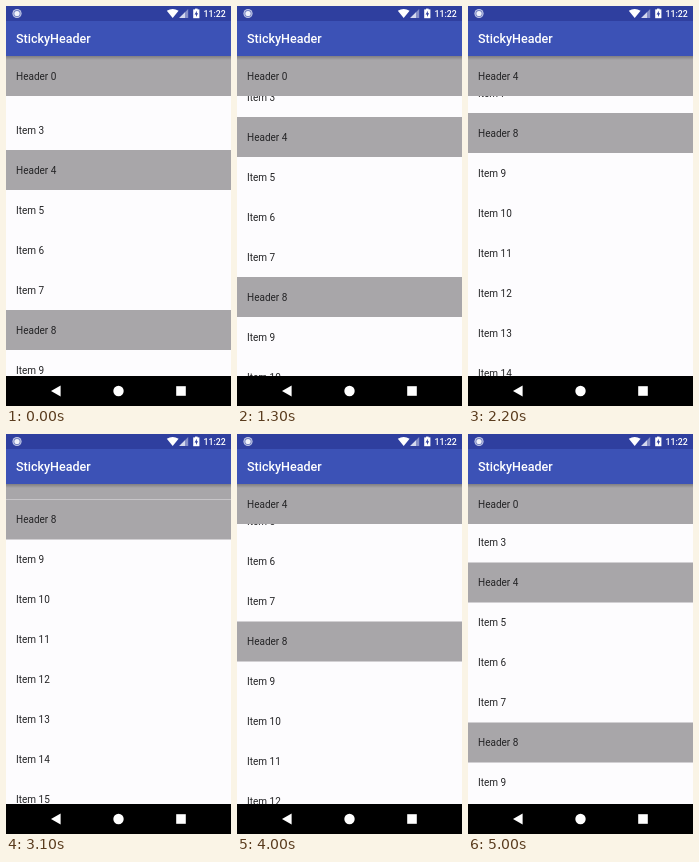
An HTML page with a canvas for the animation above (5100 ms loop, 225 by 400 pixels).

```html
<!DOCTYPE html>
<html lang="en">
<head>
<meta charset="utf-8">
<title>Sticky header list</title>
<style>
  html, body { margin: 0; width: 100%; height: 100%; overflow: hidden; background: #000; }
  canvas { display: block; width: 225px; height: 400px; }
</style>
</head>
<body>
<canvas id="stage"></canvas>
<script>
const W = 225, H = 400, LOOP = 5100, TICK = 100;
const ROW = 40, LIST_TOP = 50, LIST_BOTTOM = 370, FIRST_TOP = -16;
const HEADERS = [0, 4, 8];
const HEADER_GRAY = '#a8a6a9', PAPER = '#fdfcfe', INK = '#242426';

// Scroll path: time in ms, offset in px, speed in px per tick.
const PATH = [
  [1000, 0, 0], [1300, 33, 16], [1600, 95, 19], [2200, 197, 14.5],
  [2700, 250, 0], [2900, 250, 0], [3100, 238.5, -12], [4000, 116.5, -13.8],
  [4400, 62, -12.5], [5000, 15.5, -4.5]
];

const canvas = document.getElementById('stage');
const ctx = canvas.getContext('2d');
const ratio = window.devicePixelRatio || 1;
canvas.width = W * ratio;
canvas.height = H * ratio;
ctx.scale(ratio, ratio);

function scrollAt(time) {
  const next = PATH.findIndex(p => p[0] >= time);
  if (next <= 0) return PATH[0][1];
  const [t0, y0, v0] = PATH[next - 1], [t1, y1, v1] = PATH[next];
  const u = (time - t0) / (t1 - t0), ticks = (t1 - t0) / TICK;
  const ease = u * u * (3 - 2 * u);
  return y0 + (y1 - y0) * ease +
    ticks * u * (1 - u) * (v0 * (1 - u) - v1 * u);
}

function rect(x, y, w, h, color) {
  ctx.fillStyle = color;
  ctx.fillRect(x, y, w, h);
}

function text(str, x, y, size, weight, color) {
  ctx.font = `${weight} ${size}px Roboto, sans-serif`;
  ctx.fillStyle = color;
  ctx.fillText(str, x, y);
}

function polygon(color, ...points) {
  ctx.fillStyle = color;
  ctx.beginPath();
  points.forEach(([x, y]) => ctx.lineTo(x, y));
  ctx.fill();
}

function disc(x, y, r, color) {
  ctx.fillStyle = color;
  ctx.beginPath();
  ctx.arc(x, y, r, 0, Math.PI * 2);
  ctx.fill();
}

function drawRow(index, top) {
  const isHeader = HEADERS.includes(index);
  if (isHeader) rect(0, top, W, ROW, HEADER_GRAY);
  text(`${isHeader ? 'Header' : 'Item'} ${index}`, 10, top + 23.6, 10, 400, INK);
}

function drawList(scroll) {
  const topOf = index => FIRST_TOP + index * ROW - scroll;
  ctx.save();
  ctx.beginPath();
  ctx.rect(0, LIST_TOP, W, LIST_BOTTOM - LIST_TOP);
  ctx.clip();
  rect(0, LIST_TOP, W, LIST_BOTTOM - LIST_TOP, PAPER);

  for (let i = Math.floor((scroll + LIST_TOP - FIRST_TOP) / ROW); topOf(i) < LIST_BOTTOM; i++) {
    drawRow(i, topOf(i));
  }

  // The pinned header is pushed up by the one that follows it.
  const pinned = HEADERS.filter(i => topOf(i) <= LIST_TOP).pop();
  const following = HEADERS.find(i => i > pinned);
  const limit = following === undefined ? LIST_TOP : topOf(following) - ROW;
  const pinnedTop = Math.min(LIST_TOP, limit);
  rect(0, pinnedTop, W, ROW, PAPER);
  drawRow(pinned, pinnedTop);

  const shadow = ctx.createLinearGradient(0, LIST_TOP, 0, LIST_TOP + 4);
  shadow.addColorStop(0, 'rgba(0,0,0,.24)');
  shadow.addColorStop(1, 'rgba(0,0,0,0)');
  rect(0, LIST_TOP, W, 4, shadow);
  ctx.restore();
}

function drawStatusBar() {
  rect(0, 0, W, 15, '#2f3f9f');
  disc(11, 7.5, 4.6, '#c3c9e6');
  disc(11, 7.5, 3.5, '#7380c1');
  disc(11, 7.5, 2.6, '#f1f3fb');

  ctx.fillStyle = '#fff';
  ctx.beginPath();
  ctx.moveTo(166.7, 12);
  ctx.lineTo(160.8, 4.8);
  ctx.quadraticCurveTo(166.7, 1.2, 172.6, 4.8);
  ctx.fill();

  polygon('#8790c8', [182.2, 3], [182.2, 12], [173.2, 12]);
  polygon('#d5d9ee', [179, 6.2], [179, 12], [173.2, 12]);

  rect(189, 2.6, 2.6, 1.5, '#fff');
  rect(187.2, 3.4, 6.2, 8.8, '#fff');
  polygon('#2f3f9f', [190.8, 4.8], [188.6, 8.4], [190, 8.4],
    [190, 10.9], [192.1, 7.3], [190.8, 7.3]);
  text('11:22', 197.6, 10.9, 8.75, 500, '#fff');
}

function drawToolbar() {
  rect(0, 15, W, 35, '#3c52b6');
  text('StickyHeader', 10, 37.4, 12.5, 500, '#fff');
}

function drawNavigation() {
  rect(0, LIST_BOTTOM, W, H - LIST_BOTTOM, '#000');
  polygon('#fff', [45, 385], [54.6, 379.4], [54.6, 390.6]);
  disc(112.5, 385, 5.2, '#fff');
  rect(170.2, 380.2, 9.6, 9.6, '#fff');
}

function frame(now) {
  const time = Math.floor((now % LOOP) / TICK) * TICK;
  drawList(scrollAt(time));
  drawStatusBar();
  drawToolbar();
  drawNavigation();
  requestAnimationFrame(frame);
}
frame(0);
</script>
</body>
</html>
```
